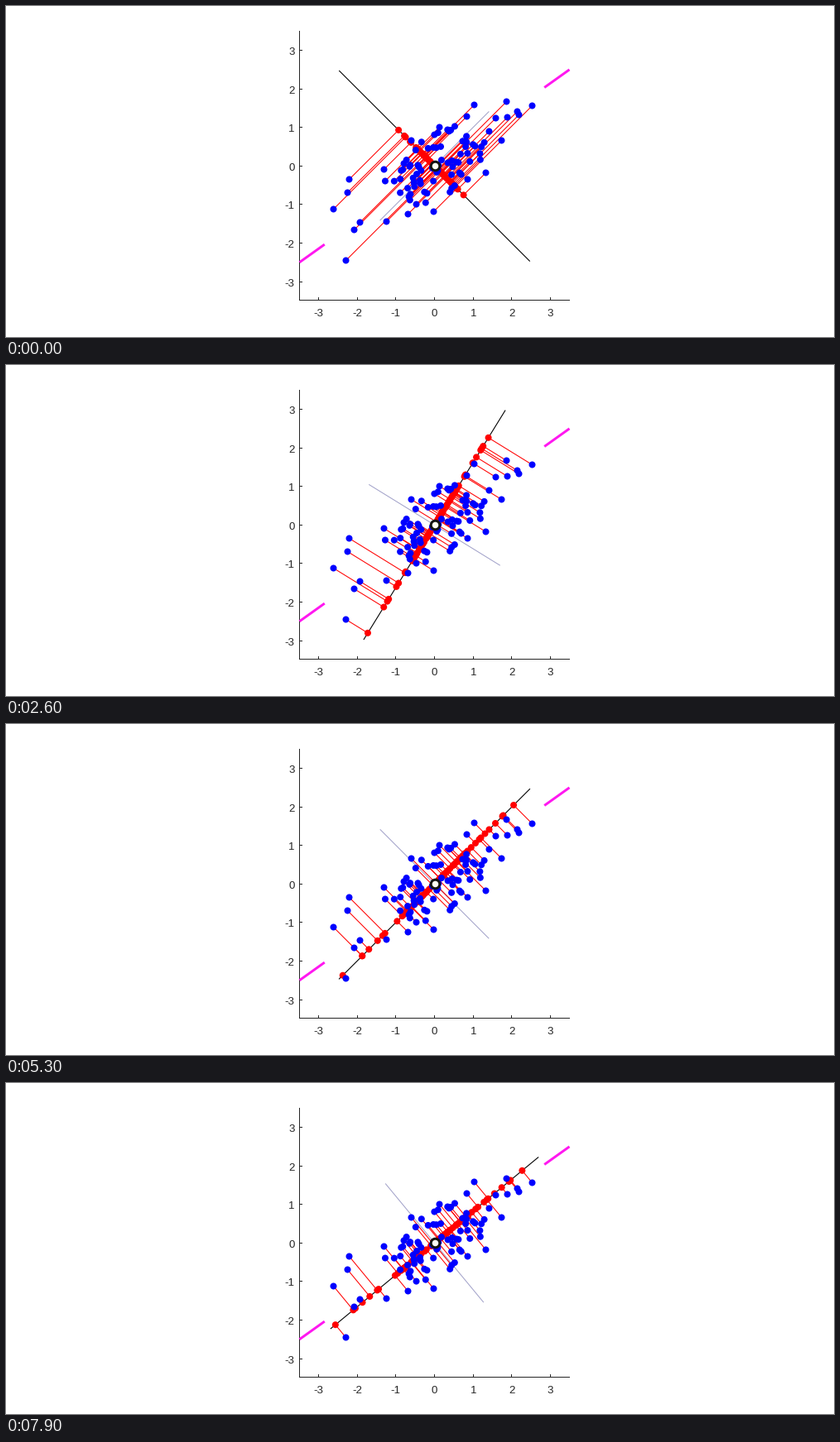
A matplotlib script that plays this animation: 1000 by 400 pixels, repeating every 8000 ms.

```python
import numpy as np
import matplotlib.pyplot as plt
from matplotlib.animation import FuncAnimation
from matplotlib.collections import LineCollection

W, H, DPI = 1000, 400, 100
PX = 72 / DPI
UNIT = 46.57
CENTER = np.array([517.5, 193.3])
REST = 35.5
FRAMES, STEP = 80, 100
INK = "#262626"

# Key samples on the rim of the cloud, in pixels
RIM = [
    (565, 119), (604, 115), (617, 127), (635, 120), (619, 131), (605, 134),
    (591, 135), (556, 133), (583, 151), (598, 162), (579, 201), (557, 209),
    (523, 146), (489, 162), (456, 197), (414, 209), (412, 225), (395, 245),
    (427, 261), (420, 270), (410, 307), (459, 260), (485, 251), (516, 248),
]


def to_px(x, y):
    return CENTER + UNIT * np.stack([x, -np.asarray(y)], axis=-1)


def make_points(inner=72, seed=7):
    """Rim samples plus a tilted elliptical core."""
    rng = np.random.default_rng(seed)
    r, turn = rng.random(inner) ** 0.55, rng.random(inner) * 2 * np.pi
    u, v = 1.5 * r * np.cos(turn), 0.8 * r * np.sin(turn)
    c, s = np.cos(np.radians(REST)), np.sin(np.radians(REST))
    core = to_px(u * c - v * s, u * s + v * c)
    return np.vstack([np.array(RIM) + 0.5, core])


def swing(start=-45.0, pull=1.64, damping=0.93):
    """Damped pendulum: angle in radians for every frame."""
    angle, speed, out = start, 0.0, []
    for _ in range(FRAMES):
        out.append(angle)
        speed = damping * (speed + pull * np.sin(np.radians(2 * (REST - angle))))
        angle += speed
    return np.radians(out)


def line(xs, ys, color, width=1.0, z=1):
    return ax.plot(xs, ys, color=color, lw=width * PX, zorder=z, snap=False,
                   solid_capstyle="butt")[0]


def dots(xy, color, z):
    # One size per dot keeps sub-pixel positions
    sizes = np.full(len(xy), (8 * PX) ** 2)
    return ax.scatter(xy[:, 0], xy[:, 1], s=sizes, c=color, linewidths=0,
                      zorder=z)


def draw_axes():
    left, right, top, bottom = 354.5, 681, 30, 355.5
    line([left, left], [top, bottom + 0.5], INK)
    line([left - 0.5, right], [bottom, bottom], INK)
    font = dict(family="Liberation Sans", size=13.3 * PX, color=INK)
    for v in range(-3, 4):
        x, y = np.floor(to_px(v, v)) + 0.5
        line([x, x], [bottom, bottom - 3.5], INK)
        line([left, left + 3.5], [y, y], INK)
        ax.text(x, 375, str(v), ha="center", va="baseline", **font)
        ax.text(348.5, y + 5.5, str(v), ha="right", va="baseline", **font)


fig = plt.figure(figsize=(W / DPI, H / DPI), dpi=DPI, facecolor="white")
ax = fig.add_axes([0, 0, 1, 1])
ax.set_xlim(0, W)
ax.set_ylim(H, 0)
ax.axis("off")
draw_axes()

for side in (-1, 1):
    x = side * np.array([2.85, 3.5])
    line(*to_px(x, x * 2.5 / 3.5).T, "#ff18f0", 3)

points = make_points()
angles = swing()
main = line([], [], "black", 1.1, 3)
normal = line([], [], "#a0a0c8", 1, 2)
links = LineCollection([], colors="red", linewidths=1.05 * PX, zorder=4)
ax.add_collection(links)
shadows = dots(points, "red", 5)
dots(points, "blue", 6)
ax.scatter([CENTER[0]], [CENTER[1]], s=(10.6 * PX) ** 2, c="#fffff4",
           edgecolors="#141414", linewidths=3 * PX, zorder=7)


def set_ray(artist, direction, length):
    ends = CENTER + np.outer([-length, length], direction) * UNIT
    artist.set_data(ends[:, 0], ends[:, 1])


def update(i):
    c, s = np.cos(angles[i]), np.sin(angles[i])
    axis = np.array([c, -s])
    set_ray(main, axis, 3.5)
    set_ray(normal, np.array([s, c]), 2)
    feet = CENTER + np.outer((points - CENTER) @ axis, axis)
    links.set_segments(np.stack([points, feet], axis=1))
    shadows.set_offsets(feet)
    return main, normal, links, shadows


anim = FuncAnimation(fig, update, frames=FRAMES, interval=STEP, repeat=True,
                     repeat_delay=0, blit=False)
plt.show()
```
